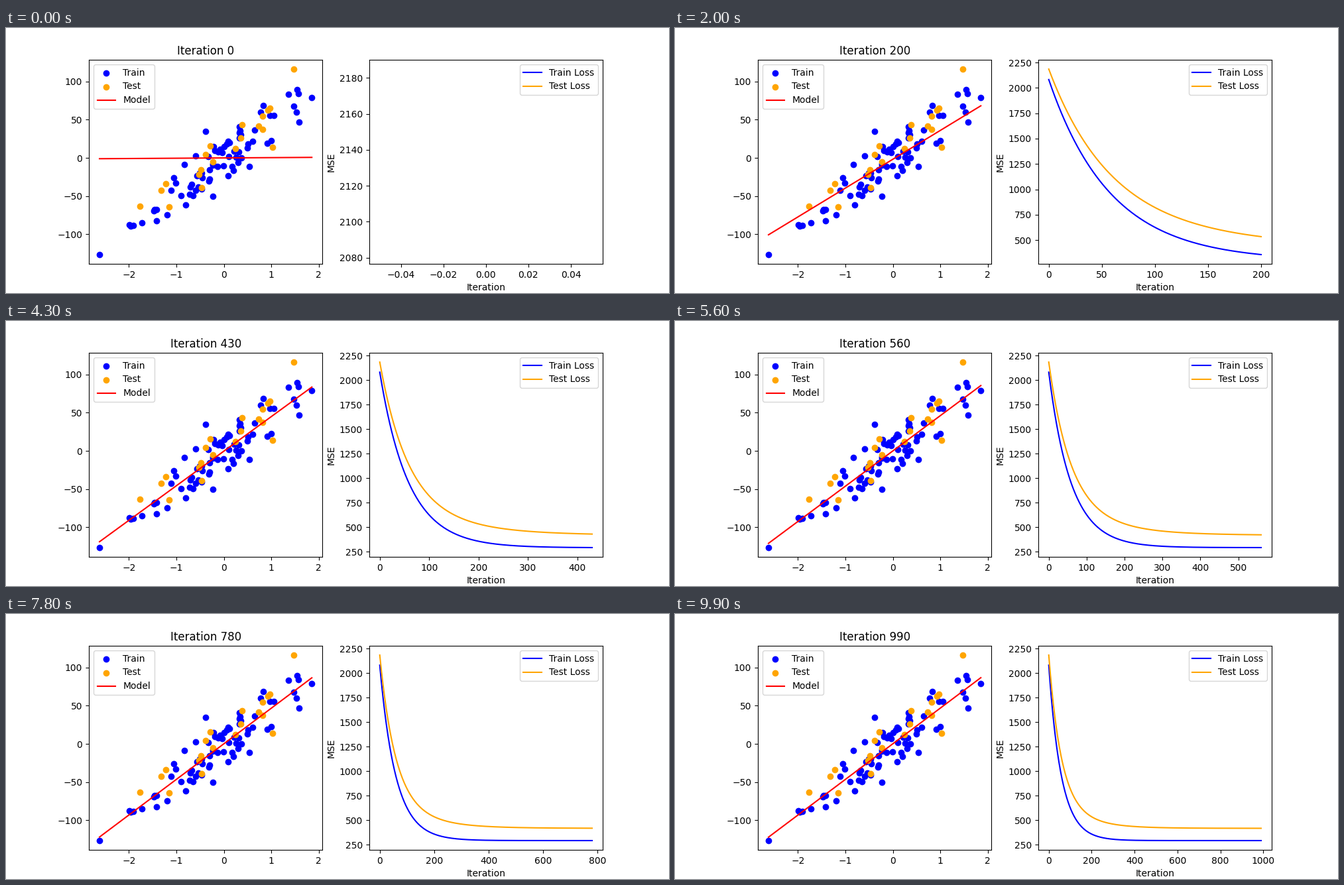
Write a matplotlib script that moves like this. It is 1000 by 400 pixels and loops after 10 s.

```python
import numpy as np
import matplotlib.pyplot as plt
from matplotlib.animation import FuncAnimation

SEED = 42
SAMPLES = 100
TESTS = 20
NOISE = 20
FRAMES = 100
STEP = 10      # descent steps per frame
RATE = 0.01


def make_data():
    """Noisy points along a random slope, in shuffled order."""
    rng = np.random.RandomState(SEED)
    x = rng.standard_normal(SAMPLES)
    y = 100 * rng.uniform() * x
    y += rng.normal(scale=NOISE, size=SAMPLES)
    order = np.arange(SAMPLES)
    rng.shuffle(order)
    return x[order], y[order]


def mse(x, y, w, b):
    return np.mean((w * x + b - y) ** 2)


def descend(steps):
    """Linear regression by gradient descent, starting from zero."""
    w = b = 0.0
    params, losses = [], []
    for _ in range(steps):
        err = w * x_train + b - y_train
        w -= RATE * np.mean(err * x_train)
        b -= RATE * np.mean(err)
        params.append((w, b))
        losses.append((mse(x_train, y_train, w, b), mse(x_test, y_test, w, b)))
    return params, np.array(losses)


x, y = make_data()
split = np.random.RandomState(SEED).permutation(SAMPLES)
test, train = split[:TESTS], split[TESTS:]
x_train, y_train = x[train], y[train]
x_test, y_test = x[test], y[test]
params, losses = descend(FRAMES * STEP)
ends = np.array([x.min(), x.max()])

fig, (ax_fit, ax_loss) = plt.subplots(1, 2, figsize=(10, 4), dpi=100)

ax_fit.scatter(x_train, y_train, color="blue", label="Train")
ax_fit.scatter(x_test, y_test, color="orange", label="Test")
model, = ax_fit.plot(ends, 0 * ends, color="red", label="Model")
title = ax_fit.set_title("Iteration 0")
ax_fit.legend(loc="upper left")

train_line, = ax_loss.plot([], [], color="blue", label="Train Loss")
test_line, = ax_loss.plot([], [], color="orange", label="Test Loss")
ax_loss.set_xlabel("Iteration")
ax_loss.set_ylabel("MSE")
ax_loss.legend(loc="upper right")


def draw(frame):
    it = frame * STEP
    w, b = params[it]
    model.set_ydata(w * ends + b)
    title.set_text(f"Iteration {it}")
    steps = np.arange(it + 1)
    train_line.set_data(steps, losses[:it + 1, 0])
    test_line.set_data(steps, losses[:it + 1, 1])
    ax_loss.relim()
    ax_loss.autoscale_view()
    return model, title, train_line, test_line


anim = FuncAnimation(fig, draw, frames=FRAMES, init_func=lambda: draw(0),
                     interval=100, repeat=True, repeat_delay=0, blit=False)
plt.show()
```
